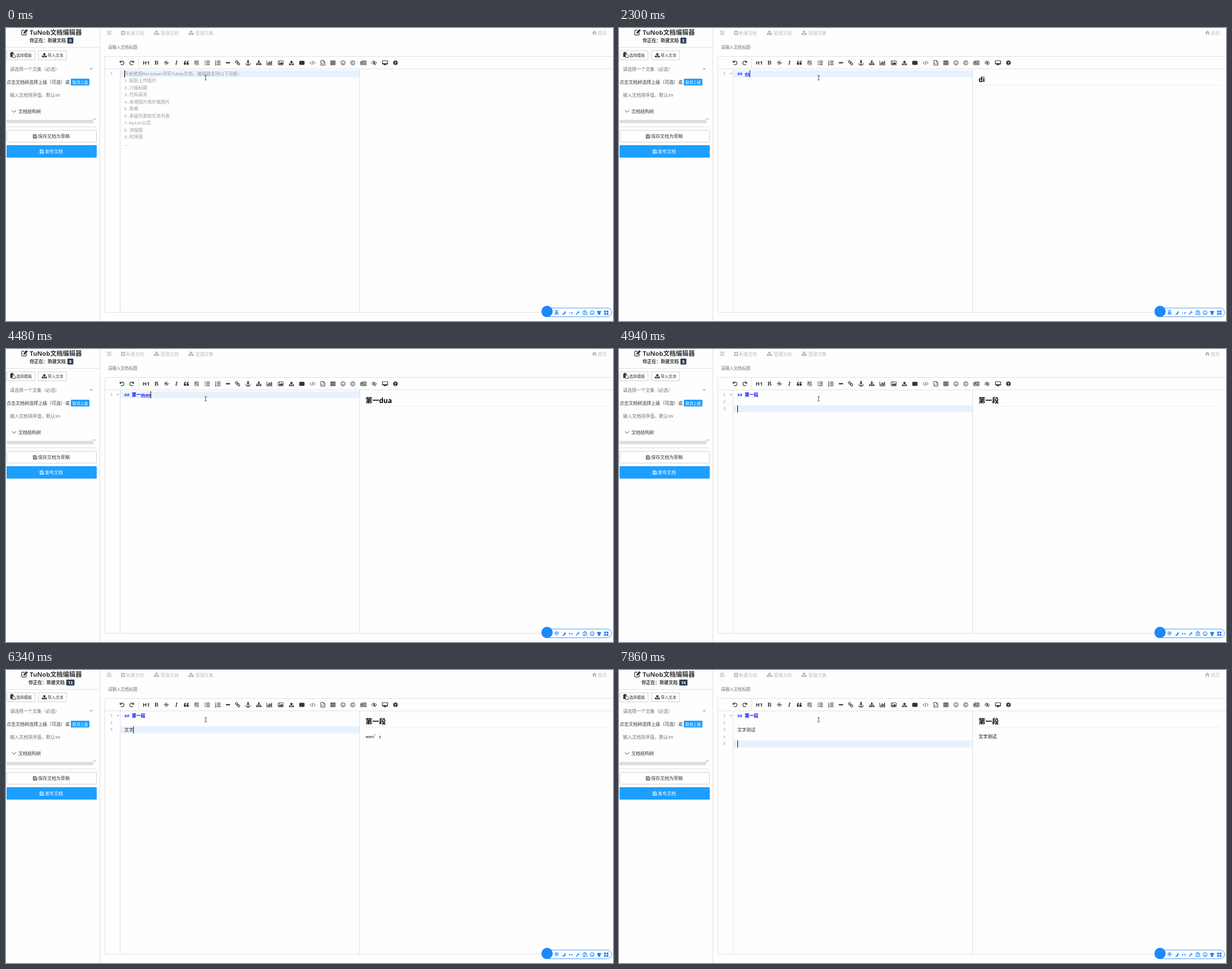
These frames come from a looping animation (1077x520 px, 8 s). An HTML page:

```html
<!DOCTYPE html>
<html lang="zh-CN">
<head>
<meta charset="utf-8">
<title>文档编辑器</title>
<style>
html, body { margin: 0; width: 100%; height: 100%; overflow: hidden; background: #fefefe; }
svg { display: block; width: 1077px; height: 520px; }
text { font: 8px "Open Sans", "Noto Sans CJK SC", "Noto Sans CJK", sans-serif; fill: #333; white-space: pre; }
.cjk { font-family: "Noto Sans CJK SC", "Noto Sans CJK", sans-serif; }
.mono { font-family: "Liberation Mono", monospace; font-size: 7.33px; }
.serif { font: bold 10.5px "Liberation Serif", serif; text-anchor: middle; }
.bold { font-weight: bold; }
.head { fill: #00f; font-weight: bold; }
.code { fill: #222; }
.hint text { fill: #999; }
.num { font: 6.6px "Liberation Mono", monospace; fill: #999; text-anchor: end; }
.nav text { fill: #bbb; }
.soft { fill: #707070; }
.white { fill: #fff; }
.ln { fill: none; stroke: #333; stroke-width: 1.2; }
.thin { stroke-width: .9; }
.ic { fill: #333; }
.pale { fill: #bbb; }
.frame { fill: none; stroke: #e0e0e0; }
.btn { fill: #fff; stroke: #d2d2d2; }
.blue { fill: #1e9fff; }
.ime path, .ime text { fill: #2080f0; }
.ime .ln { fill: none; stroke: #2080f0; stroke-width: 1; }
</style>
</head>
<body>
<svg viewBox="0 0 1077 520">
<defs>
  <path id="save" d="M-3.2-3.2H1.8L3.2-1.8V3.2H-3.2ZM-1.6-3V-1H1.2V-3M-1.8 3V.9H1.8V3" fill="none" stroke-width=".9"/>
  <path id="cubes" d="M0-4.2 2.4-3.2V-.8L0 .2-2.4-.8V-3.2ZM-2.5 0-.2 1V3.2L-2.5 4.2-4.9 3.2V1ZM2.5 0 4.9 1V3.2L2.5 4.2.2 3.2V1Z"/>
  <path id="up" class="ic" d="M0-4 3.2-.8H1.2V1.8H-1.2V-.8H-3.2ZM-4.3 1H-2V2.6H2V1H4.3V4H-4.3Z"/>
  <g id="undo"><path class="ln" d="M-2.8-1.6A3.3 3.3 0 1 1-2.5 2.3"/><path class="ic" d="M-4.2-4.2V-.4H-.4Z"/></g>
  <path id="quote" class="ic" d="M-4.3.2C-4.3-2.2-3-3.6-.6-3.7V-2.3C-1.9-2.2-2.5-1.5-2.5-.4H-.6V3.4H-4.3Z"/>
</defs>

<!-- sidebar -->
<path class="frame" d="M166.5 0V520M0 34.5H166M0 175.5H160"/>
<path class="ln" d="M36 8V11.2Q36 12.4 34.8 12.4H29Q27.8 12.4 27.8 11.2V5Q27.8 3.8 29 3.8H33"/>
<path class="ic" d="M31 9.8V7.4L36.3 2.1 38.7 4.5 33.4 9.8Z"/>
<text class="bold" x="42" y="12" style="font-size:11.2px">TuNob文档编辑器</text>
<g id="status">
  <text class="bold" x="42" y="25">你正在：新建文档</text>
  <rect id="badge" x="109" y="17" width="10.5" height="10.5" rx="1" fill="#2f4056"/>
  <text id="count" class="white bold" y="25" text-anchor="middle" style="font-size:7px"></text>
</g>
<path class="btn" d="M1.5 40.5H51.5V56.5H1.5ZM57.5 40.5H107.5V56.5H57.5Z"/>
<path class="ic" d="M7.5 43.5H9.3V42.6H11.8V43.5H13.6V45.8H11V51.5H7.5Z"/>
<path class="ln thin" d="M11.8 46.6H14.4L16.4 48.6V52.4H11.8Z"/>
<text x="18" y="51" style="font-size:7px">选择模板</text>
<use href="#up" x="68" y="48"/>
<text x="74" y="51" style="font-size:7px">导入文本</text>
<text class="soft" x="7" y="76">请选择一个文集（必选）</text>
<path fill="#c2c2c2" d="M148 71H154.5L151.2 75Z"/>
<text x="1" y="98.7">点击文档树选择上级（可选）或</text>
<rect class="blue" x="115" y="90" width="33" height="12" rx="1"/>
<text class="white" x="118" y="98.6" style="font-size:6.8px">取消上级</text>
<text class="soft" x="7" y="122">输入文档排序值，默认99</text>
<path class="ln thin" d="M10.5 146 14.2 149.6 18 146"/>
<text x="22" y="150.6">文档结构树</text>
<path fill="#ddd" d="M1 163H155V169H1ZM154 160H160V163H154Z"/>
<rect class="btn" x="1.5" y="181.5" width="159" height="21" rx="1"/>
<use href="#save" x="51.5" y="192.3" stroke="#333"/>
<text x="57" y="195.3">保存文档为草稿</text>
<rect class="blue" x="1" y="208" width="160" height="22" rx="1"/>
<use href="#save" x="63.5" y="219.3" stroke="#fff"/>
<text class="white" x="69" y="222.3">发布文档</text>

<!-- top navigation -->
<g class="nav">
  <path class="pale" d="M179 5H187V6.3H179ZM179 7.8H187V9.1H179ZM179 10.6H187V11.9H179Z"/>
  <rect class="pale" x="204" y="5" width="7.4" height="7.4" rx="1"/>
  <path stroke="#fff" stroke-width="1.3" d="M205.4 8.7H210M207.7 6.4V11"/>
  <text x="213" y="11.5">新建文档</text>
  <use class="pale" href="#cubes" x="267" y="8.6"/>
  <text x="274.5" y="11.5">管理文档</text>
  <use class="pale" href="#cubes" x="328.5" y="8.6"/>
  <text x="336" y="11.5">管理文集</text>
  <path class="pale" d="M1044 4.5 1048.5 8.6H1047V12.3H1045V9.6H1043V12.3H1041V8.6H1039.5Z"/>
  <text x="1050" y="11.5">首页</text>
</g>
<text class="soft" x="181" y="36.5" style="font-size:7.47px">请输入文档标题</text>

<!-- editor frame -->
<path class="frame" d="M1080 50.5H175.5V504.5H1080M175 72.5H1080M202.5 73V504M627.5 73V504M235.5 52V71"/>

<!-- toolbar -->
<use href="#undo" x="206" y="61.8"/>
<use href="#undo" transform="translate(223 61.8) scale(-1 1)"/>
<text class="bold" x="242.6" y="65" style="font-size:9.4px">H1</text>
<text class="serif" x="267" y="65.2">B</text>
<text class="serif" x="284.5" y="65.2">S</text>
<path class="ln thin" d="M280 61.8H289.4"/>
<text class="serif" x="302.3" y="65.2" style="font-style:italic">I</text>
<use href="#quote" x="320" y="61.8"/>
<use href="#quote" x="324.8" y="61.8"/>
<text class="cjk" x="333.8" y="65" style="font-size:9px">楷</text>
<g transform="translate(357 61.8)"><path class="ln" d="M-4.6-3H-2.8M-4.6 0H-2.8M-4.6 3H-2.8M-1.6-3H4.7M-1.6 0H4.7M-1.6 3H4.7"/></g>
<g transform="translate(376 61.8)"><path class="ln" d="M-1.6-3H4.7M-1.6 0H4.7M-1.6 3H4.7"/><path class="ln thin" d="M-4-4.6V-2M-4.7-1H-3.3L-4.6.9H-3.2M-4.7 2.2H-3.4V4.4H-4.7M-4.4 3.3H-3.4"/></g>
<rect class="ic" x="390" y="60.5" width="7.6" height="2.2" rx=".6"/>
<g transform="translate(411 61.8) rotate(45)"><rect class="ln" x="-4.6" y="-1.6" width="4.4" height="3.2" rx="1.4"/><rect class="ln" x=".2" y="-1.6" width="4.4" height="3.2" rx="1.4"/></g>
<g transform="translate(429.5 61.8)"><circle class="ln" cy="-3.2" r="1.2"/><path class="ln" d="M0-2V4M-2.2-.6H2.2M-4 .8Q-3.6 3.9 0 4 3.6 3.9 4 .8"/></g>
<g transform="translate(448.5 61.8)"><path class="ic" d="M-1.4-4H1.4V-1.4H-1.4ZM-4.7 1.4H-2V4H-4.7ZM-1.3 1.4H1.3V4H-1.3ZM2 1.4H4.7V4H2Z"/><path class="ln thin" d="M0-2V2M-3.3 2V0H3.3V2"/></g>
<g transform="translate(467.5 61.8)"><path class="ln thin" d="M-4.8-4V3.7H5"/><path class="ic" d="M-3.5 0H-2V2.8H-3.5ZM-1.3-2.6H.2V2.8H-1.3ZM.9-1.2H2.4V2.8H.9ZM3-3.5H4.5V2.8H3Z"/></g>
<g transform="translate(487.5 61.8)"><rect class="ln thin" x="-4.6" y="-3.6" width="9.2" height="7.2" rx=".6"/><path class="ic" d="M-3.6 2.7V1.2L-2 0-.9.9 1.5-1.6 3.6.5V2.7Z"/><circle class="ic" cx="-2.2" cy="-1.6" r=".9"/></g>
<use href="#up" x="506.5" y="61.8"/>
<rect class="ic" x="520.3" y="58.2" width="9.4" height="7.2" rx="1.6"/>
<g transform="translate(544 61.8)"><path class="ln thin" d="M-2.2-2.4-4.5 0-2.2 2.4M2.2-2.4 4.5 0 2.2 2.4M.9-3.5-.9 3.5"/></g>
<g transform="translate(562.2 61.8)"><path class="ln thin" d="M-3.6-4.2H1.2L3.6-1.8V4.2H-3.6ZM1-4.2V-1.6H3.6M-.9 0-2.2 1.3-.9 2.6M.9 0 2.2 1.3.9 2.6"/></g>
<g transform="translate(580 61.8)"><path class="ln thin" d="M-4-3.5H4V3.5H-4ZM-4-2.5H4M-4-.3H4M-4 1.7H4M-1.3-3V3.5M1.4-3V3.5"/></g>
<g transform="translate(598 61.8)"><circle class="ln thin" r="3.8"/><path class="ln thin" d="M-2 .9Q0 3.2 2 .9M-1.4-1.8V-.6M1.4-1.8V-.6"/></g>
<g transform="translate(615.3 61.8)"><circle class="ln thin" r="3.8"/><path class="ln thin" d="M1.5-1.1A1.8 1.8 0 1 0 1.5 1.1"/></g>
<g transform="translate(634 61.8)"><path class="ln thin" d="M-3.5-3.3H5V3.3H-4Q-5 3.3-5 2V-2H-3.5V3M.8-1.7H4M.8 0H4M-2.3 1.7H4"/><rect class="ic" x="-2.4" y="-2.1" width="2.6" height="2.6"/></g>
<g transform="translate(653.3 61.8)"><path class="ln thin" d="M-4.6 0Q0-5.4 4.6 0 0 5.4-4.6 0ZM-2.6-4 2.6 4"/><circle class="ic" r="1.5"/></g>
<g transform="translate(672.5 61.8)"><rect class="ln" x="-4.6" y="-3.8" width="9.2" height="5.8" rx=".6"/><path class="ic" d="M-4.6.6H4.6V2.4H-4.6ZM-1.2 2H1.2L2 4.2H-2Z"/></g>
<circle class="ic" cx="691" cy="61.8" r="4"/>
<text class="white bold" x="691" y="64.6" text-anchor="middle" style="font-size:7px">?</text>

<!-- editing area, filled by script -->
<rect id="row" x="203" width="424" height="12.5" fill="#e8f2ff"/>
<g id="nums"></g>
<path id="fold" fill="#999" d="M197 80H200.6L198.8 82.4Z"/>
<g id="hint" class="hint"></g>
<g id="code"></g>
<path id="mark" stroke-width=".7"/>
<rect id="caret" width="1" height="12.5" fill="#000"/>
<g id="view"></g>
<path class="ln thin" d="M352.2 84.4H353.4L354.2 85 355 84.4H356.2M354.2 85V91.6M352.2 92.2H353.4L354.2 91.6 355 92.2H356.2"/>

<!-- input method bar -->
<rect x="951" y="497" width="123.5" height="15.5" rx="7.7" fill="#fff" stroke="#4a9cf7"/>
<circle cx="960" cy="503" r="10" fill="#1e88f8"/>
<g class="ime">
  <text id="mode" class="bold" x="973" y="508" style="font-size:7.6px"></text>
  <path d="M991.6 502A3.4 3.4 0 1 1 986.6 507.4Q991 507 991.6 502Z"/>
  <path id="dots"/>
  <path d="M1011.3 507.6 1014.3 504.6Q1013.8 502 1016.6 501.6L1015.4 503.2 1016.6 504.4 1018.2 503.2Q1017.8 506 1015.3 505.6L1012.5 508.8Z"/>
  <path class="ln" d="M1026 508.5H1024V502.5H1029.6V504M1026.6 504.8H1030.6V508.8H1026.6ZM1025.6 501.6H1028.2"/>
  <circle class="ln" cx="1040" cy="505.2" r="3.6"/>
  <path class="ln" d="M1038 506Q1040 508.4 1042 506M1038.6 503.3V504.4M1041.4 503.3V504.4"/>
  <path d="M1050.6 501.7Q1052.3 503 1054 501.7L1056.2 503.3 1055.2 505.2 1054.4 504.8V508.8H1050.2V504.8L1049.4 505.2 1048.4 503.3Z"/>
  <path d="M1061.2 501.6H1064.5V504.8H1061.2ZM1065.5 501.6H1068.8V504.8H1065.5ZM1061.2 505.7H1064.5V508.9H1061.2ZM1065.5 505.7H1068.8V508.9H1065.5Z"/>
</g>
</svg>
<script>
const LOOP = 8000, LEFT = 210, TOP = 75, ROW = 12.5;
const HINT = ['开始使用Markdown书写TuNob文档，编辑器支持以下功能:', '1.粘贴上传图片', '2.六级标题',
  '3.代码高亮', '4.本地图片和外链图片', '5.表格', '6.多级列表和任务列表', '7.Katex公式', '8.流程图', '9.时序图', '……'];
const H = '## 第一段', P = H + '\n\n';

// code: typed text, src: text last rendered
const steps = [
  [0, { code: '', src: '', caret: 1, fold: 0, zh: 0 }],
  [150, { caret: 0 }],
  [740, { caret: 1 }],
  [880, { code: '#' }],
  [1020, { code: '##' }],
  [1300, { src: '##' }],
  [1580, { code: '## ' }],
  [1720, { fold: 1 }],
  [1860, { src: '## ' }],
  [2010, { code: '## d' }],
  [2150, { code: '## di' }],
  [2300, { src: '## di' }],
  [2450, { code: '## d' }],
  [2570, { code: '## ' }],
  [2880, { src: '## ', zh: 1 }],
  [3030, { code: '## d' }],
  [3180, { code: '## di' }],
  [3340, { code: "## di'y" }],
  [3500, { code: "## di'yi" }],
  [3660, { src: "## di'yi" }],
  [3820, { code: '## 第一' }],
  [3970, { code: '## 第一d' }],
  [4100, { code: '## 第一du' }],
  [4230, { code: '## 第一dua' }],
  [4360, { code: '## 第一duan', src: '## 第一dua' }],
  [4500, { code: H }],
  [4630, { code: H + '\n', src: H }],
  [4940, { code: P, src: P }],
  [5340, { caret: 0 }],
  [5620, { code: P + 'w', caret: 1 }],
  [5760, { code: P + 'we' }],
  [5900, { code: P + 'wen' }],
  [6040, { code: P + "wen'z" }],
  [6190, { code: P + "wen'zi", src: P + "wen'z" }],
  [6340, { code: P + '文字' }],
  [6480, { code: P + '文字c' }],
  [6610, { code: P + '文字ce', src: P + '文字' }],
  [6760, { code: P + "文字ce's" }],
  [6890, { code: P + "文字ce'shi" }],
  [7020, { code: P + '文字测试' }],
  [7150, { src: P + '文字测试' }],
  [7580, { caret: 0 }],
  [7720, { code: P + '文字测试\n', caret: 1 }],
  [7860, { code: P + '文字测试\n\n', src: P + '文字测试\n\n' }]
];
let last = {};
const states = steps.map(([t, change]) => (last = { ...last, ...change, t }));

const $ = id => document.getElementById(id);
const set = (id, attrs) => Object.entries(attrs).forEach(([k, v]) => $(id).setAttribute(k, v));
const show = (id, on) => set(id, { visibility: on ? 'visible' : 'hidden' });
const width = s => [...s].reduce((w, c) => w + (/[ -~…]/.test(c) ? 4.4 : 8), 0);
const rowY = i => TOP + i * ROW;

// Latin runs get the narrower monospace face
const codeLine = (s, i, cls) => `<text class="cjk ${cls}" x="${LEFT}" y="${rowY(i) + 8.8}">` +
  s.replace(/[ -~…]+/g, r => `<tspan class="mono">${r}</tspan>`) + '</text>';

const viewLine = (s, y, cls, size) => `<text class="${cls}" x="638" y="${y}" style="font-size:${size}px;fill:#000">` +
  s.replace(/'/g, '<tspan class="cjk">’</tspan>') + '</text>';

function preview(src) {
  const [first, , para] = src.split('\n');
  if (!first.startsWith('## ')) return viewLine(first, 91, '', 8);
  return viewLine(first.slice(3), 96.3, 'bold', 12) + '<path stroke="#eee" d="M638 101.5H1067"/>' +
    viewLine(para || '', 120.8, '', 8);
}

function draw(s) {
  const lines = s.code.split('\n'), n = lines.length - 1, line = lines[n];
  const end = LEFT + width(line), y = rowY(n);
  set('row', { y });
  set('caret', { x: end - (line ? .4 : 0), y });
  show('caret', s.caret);
  show('hint', !s.code);
  show('fold', s.fold);
  $('nums').innerHTML = lines.map((_, i) => `<text class="num" x="189" y="${rowY(i) + 8.3}">${i + 1}</text>`).join('');
  $('code').innerHTML = lines.map((l, i) => codeLine(l, i, l[0] === '#' ? 'head' : 'code')).join('');
  // the syllable being typed is underlined
  const from = LEFT + width(line.replace(/[a-z]+$/, ''));
  set('mark', { d: `M${from} ${y + 10.6}H${end}`, stroke: n ? '#222' : '#00f' });
  $('view').innerHTML = preview(s.src);

  const count = s.src.length, wide = count > 9;
  set('status', { transform: `translate(${wide ? -2 : 0} 0)` });
  set('badge', { width: wide ? 14.5 : 10.5 });
  set('count', { x: wide ? 116.2 : 114.2 });
  $('count').textContent = count;

  $('mode').textContent = s.zh ? '中' : '英';
  set('dots', { d: s.zh
    ? 'M999 504.3H1001.2V506.5H999ZM1003 504.3H1005.2V506.5H1003Z'
    : 'M999.4 505H1001V506.6H999.4ZM1003 504.6H1005V506.4L1003.6 508V506.4H1003Z' });
}

$('hint').innerHTML = HINT.map((l, i) => codeLine(l, i, '')).join('');
let shown;
function tick() {
  const t = performance.now() % LOOP;
  const state = states.findLast(s => s.t <= t);
  if (state !== shown) draw(shown = state);
  requestAnimationFrame(tick);
}
tick();
</script>
</body>
</html>
```
